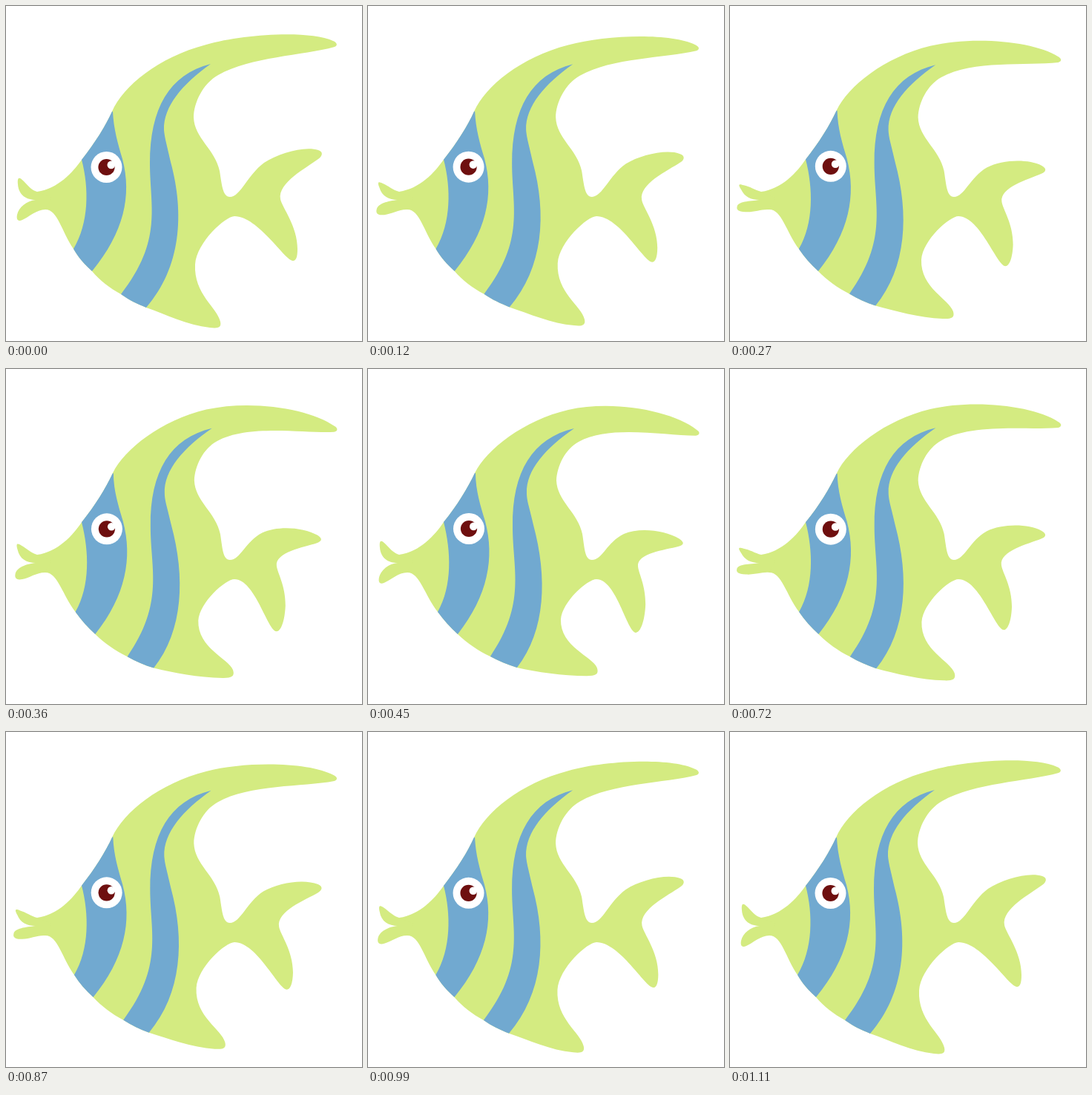
An HTML page with a canvas for the animation above (1140 ms loop, 480 px wide and 451 px high).

```html
<!DOCTYPE html>
<html lang="en">
<head>
<meta charset="utf-8">
<title>Swimming fish</title>
<style>
html, body { margin: 0; width: 100%; height: 100%; overflow: hidden; background: #fff; }
canvas { display: block; }
</style>
</head>
<body>
<canvas id="stage" width="480" height="451"></canvas>
<script>
const ctx = document.getElementById('stage').getContext('2d');
const LOOP = 1140, STEP = 30;
const GREEN = '#d4eb81', BLUE = '#71a9d0', RED = '#6e0f0f';

// Each part has two poses, written with matching commands.
const back = [
  `M42 250C70 246 90 224 102 207C120 184 134 162 143 142
   C158 108 205 69 270 52C318 38 408 32 441 47C446 49 448 53 443 55
   C400 67 330 68 286 93C266 104 253 130 253 150C254 178 282 193 288 222
   C291 240 292 257 302 257`,
  `M42 250C70 246 90 224 102 206C120 184 134 161 144 140
   C160 108 210 69 270 55C335 41 412 58 443 82C448 85 448 89 442 90
   C400 90 325 75 284 98C266 108 255 130 254 150C255 178 283 193 289 222
   C292 240 292 257 302 257`
];
const tail = [
  `C316 257 326 227 348 211C368 198 403 188 421 194C428 196 427 202 421 206
   C405 218 366 238 370 260C372 271 393 296 393 327C393 338 391 343 387 343
   C376 343 340 283 308 283`,
  `C316 257 322 233 345 222C366 213 400 217 420 229C427 234 426 237 419 239
   C400 244 362 248 364 266C365 276 374 290 374 317C373 340 367 355 361 355
   C349 355 335 283 308 283`
];
const belly = [
  `C296 283 257 318 255 348C253 388 285 406 289 425C291 434 284 434 275 433
   C245 430 215 415 189 406C177 401 166 396 155 388C140 380 126 369 116 357
   C106 348 97 338 91 327C75 304 70 274 53 274Z`,
  `C296 283 262 313 260 337C259 374 303 387 309 402C312 411 307 413 295 413
   C262 413 228 408 201 402C188 398 176 393 165 387C148 379 134 369 121 357
   C111 348 102 338 94 327C76 304 70 274 53 274Z`
];
const lips = [
  `M53 274C41 274 31 284 22 288C15 291 14 286 15 281C17 271 28 262 40 261
   C28 261 17 255 16 240C15 230 18 230 23 235C29 241 34 248 42 250L62 258Z`,
  `M53 274C43 273 33 277 22 276C10 276 8 272 9 269C10 262 26 263 40 261
   C28 261 20 257 15 248C10 241 11 240 18 242C26 243 34 248 42 250L62 258Z`
];
const faceStripe = [
  `M144 142C145 165 151 186 157 206C170 255 159 305 116 357L90 360L91 327
   C112 292 112 245 102 207L100 150Z`,
  `M145 140C145 164 152 185 158 205C171 254 162 305 121 357L94 360L94 327
   C114 292 112 245 102 206L100 150Z`
];
const sideStripe = [
  `M276 78C220 92 194 138 194 212C194 270 212 315 155 388L165 412L189 406
   C236 352 241 280 222 210C217 187 214 178 213 167C212 135 238 105 276 78Z`,
  `M278 80C222 93 194 138 195 212C195 270 214 315 165 387L175 410L201 402
   C240 352 242 280 223 210C218 187 214 178 214 167C213 136 240 106 278 80Z`
];

function mix([a, b], k) {
  const end = b.match(/\d+/g);
  let i = 0;
  return a.replace(/\d+/g, n => +n + (end[i++] - n) * k);
}

// Swings between 0 and 1, turning at each of the given times.
function swing(t, turns) {
  const i = turns.findIndex((at, n) => n && t <= at);
  if (i < 0) return 0;
  const x = (t - turns[i - 1]) / (turns[i] - turns[i - 1]);
  const ease = (1 - Math.cos(Math.PI * x)) / 2;
  return i % 2 ? ease : 1 - ease;
}

function fill(path, color) {
  ctx.fillStyle = color;
  ctx.fill(path);
}

function dot(x, y, r, color) {
  const p = new Path2D();
  p.arc(x, y, r, 0, 2 * Math.PI);
  fill(p, color);
}

function draw(t) {
  const bend = swing(t, [0, 480, 1110]);
  const pout = swing(t, [0, 220, 470, 760, 1110]);
  const body = new Path2D([back, tail, belly].map(part => mix(part, bend)).join(''));

  ctx.clearRect(0, 0, 480, 451);
  fill(body, GREEN);
  fill(new Path2D(mix(lips, pout)), GREEN);

  ctx.save();
  ctx.clip(body);
  for (const stripe of [faceStripe, sideStripe]) fill(new Path2D(mix(stripe, bend)), BLUE);
  ctx.restore();

  const x = 135.5 + bend * 0.5, y = 217 - bend * 2;
  dot(x, y, 21, '#fff');
  dot(x, y, 11.1, RED);
  dot(x + 6.3, y - 3.1, 5.3, '#fff');
}

function tick() {
  const t = performance.now() % LOOP;
  draw(Math.floor(t / STEP) * STEP);
  requestAnimationFrame(tick);
}
tick();
</script>
</body>
</html>
```
